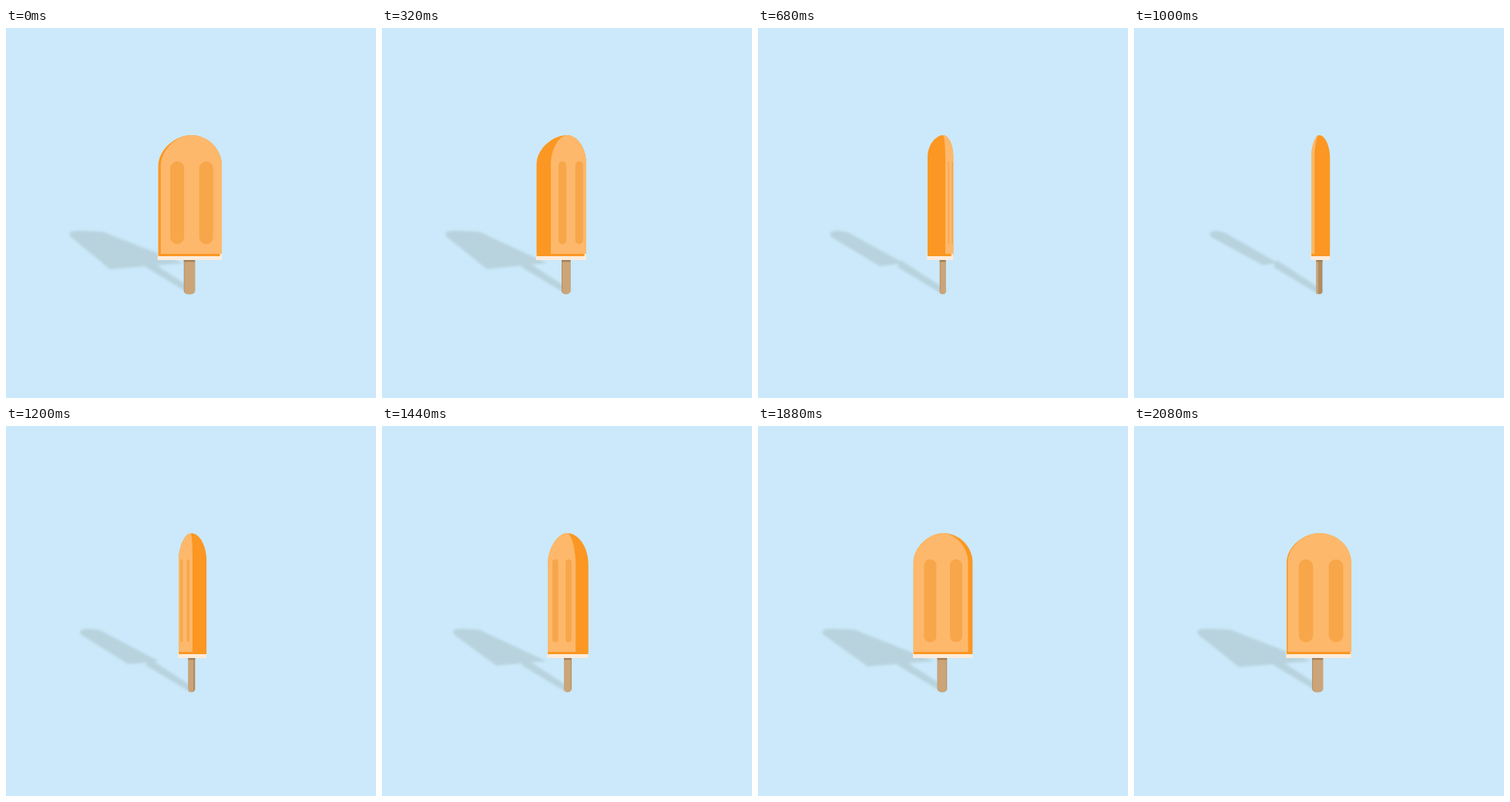
These frames come from a looping animation (480 by 480 pixels, 2120 ms). An HTML page with a canvas:

```html
<!DOCTYPE html>
<html>
<head>
<meta charset="utf-8">
<style>
html, body { margin: 0; height: 100%; overflow: hidden; background: #cbe9fa; }
canvas { display: block; }
</style>
</head>
<body>
<canvas id="stage" width="480" height="480"></canvas>
<script>
const ctx = document.getElementById('stage').getContext('2d');
const LOOP = 2120, STEP = 40, TOP = 139, APEX = 240;
const HALF_TURN = 53; // growth of the turn value over one loop

// time, turn, body left/right, dome height, stick left/right, groove inset,
// shadow x: tip, shoulder, right corner, lower corner
const keys = [
  [0, 3.3, 197.5, 280, 40, 230.7, 245.2, .155, 81, 124, 230, 135],
  [320, 18.5, 200.5, 265, 38, 233, 244.5, .217, 81, 124, 214, 136],
  [680, 23, 220, 253.3, 28, 235.7, 243.5, .35, 92, 112, 189, 158],
  [850, 26.5, 227, 253, 28, 236, 243.8, .25, 96, 110, 187, 164],
  [1000, 33, 230, 254.2, 30, 236.5, 244.5, .1, 97, 112, 187, 167],
  [1440, 36.5, 215, 267.7, 41, 236, 246, .167, 91, 124, 213, 148],
  [1720, 42, 205.3, 275, 39, 234, 245.3, .2, 84, 124, 226, 146],
  [2080, 54.5, 198, 281.7, 38, 231, 245.2, .172, 81, 124, 230, 136]
];

function keyAt(i) {
  const n = keys.length, lap = Math.floor(i / n), k = keys[i - lap * n].slice();
  k[0] += lap * LOOP;
  k[1] += lap * HALF_TURN;
  return k;
}

// Smooth curve through the keys, seamless across the loop point
function poseAt(t) {
  let i = keys.length - 1;
  while (keys[i][0] > t) i--;
  const [a, b, c, d] = [i - 1, i, i + 1, i + 2].map(keyAt);
  const h = c[0] - b[0], p = (t - b[0]) / h, q = 1 - p;
  return b.map((v, j) => {
    const m0 = (c[j] - a[j]) / (c[0] - a[0]) * h;
    const m1 = (d[j] - b[j]) / (d[0] - b[0]) * h;
    return q * q * (1 + 2 * p) * v + p * q * q * m0
      + p * p * (3 - 2 * p) * c[j] - p * p * q * m1;
  });
}

function rect(color, x0, y0, x1, y1) {
  ctx.fillStyle = color;
  ctx.fillRect(x0, y0, x1 - x0, y1 - y0);
}

function pill(color, x, y, w, h, radii) {
  ctx.fillStyle = color;
  ctx.beginPath();
  ctx.roundRect(x, y, w, h, radii);
  ctx.fill();
}

function curveUp(x, ry) {
  const y = TOP + ry;
  ctx.lineTo(x, y);
  ctx.bezierCurveTo(x, y - .55 * ry, APEX - .45 * (APEX - x), TOP, APEX, TOP);
}

function drawShadow(tip, shoulder, right, low) {
  ctx.save();
  ctx.filter = 'blur(1.8px)';
  ctx.fillStyle = '#b8d3de';
  ctx.beginPath();
  ctx.moveTo(low, 313 - (low - 135) * .17);
  ctx.lineTo(tip + 3, 271);
  ctx.quadraticCurveTo(tip - 3, 263, tip + 12, 263);
  ctx.lineTo(shoulder - 2, 264);
  ctx.quadraticCurveTo(shoulder + 4, 264, shoulder + 10, 268);
  ctx.lineTo(right, 305);
  ctx.closePath();
  ctx.moveTo(185, 301);
  ctx.lineTo(246, 341);
  ctx.lineTo(237, 344);
  ctx.lineTo(181, 310);
  ctx.fill();
  ctx.restore();
}

function drawStick(left, right, side, sideShare) {
  const w = right - left, r = Math.min(w / 2, 5);
  const edge = Math.max(.8, w * sideShare ** (side < 0 ? 2 : 6));
  pill('#b08c60', left, 299, w, 46.2, [0, 0, r, r]);
  if (edge < w) pill('#cba478', left + (side > 0 ? edge : 0), 299, w - edge, 46.2, [0, 0, r, r]);
  rect('#a27e58', left, 300, right, 303.3);
}

function drawIce(left, right, ry, side, inset) {
  rect('#fcecdc', left - .7, 293, right, 301);
  ctx.save();
  ctx.beginPath();
  ctx.moveTo(left, 296);
  curveUp(left, ry);
  ctx.bezierCurveTo(APEX + .55 * (right - APEX), TOP, right, TOP + .45 * ry, right, TOP + ry);
  ctx.lineTo(right, 296);
  ctx.closePath();
  ctx.fillStyle = '#fb9722';
  ctx.fill();
  ctx.clip();

  const edge = side > 0 ? left + side : right + side;
  const x0 = side > 0 ? edge : left, w = side > 0 ? right - edge : edge - left;
  if (w > 0) {
    const outer = side > 0 ? 480 : 0;
    ctx.beginPath();
    ctx.moveTo(edge, 293);
    curveUp(edge, ry);
    ctx.lineTo(outer, TOP);
    ctx.lineTo(outer, 293);
    ctx.fillStyle = '#fdb86b';
    ctx.fill();
    const gw = .24 * w - 1;
    if (gw > 0) {
      for (const f of [inset, inset + .475]) {
        pill('#f8a64a', x0 + f * w, 173, gw, 107.5, gw / 2);
      }
    }
    if (side > 0) rect('#fcecdc', right - Math.min(2.5, side * .75), 293, right, 296);
  }
  ctx.restore();
}

function draw(now) {
  const t = Math.floor(now % LOOP / STEP) * STEP;
  const [, turn, left, right, ry, s0, s1, inset, ...shadow] = poseAt(t);
  // positive: side face shows on the left; negative: on the right
  let side = turn < HALF_TURN / 2 ? turn : turn - HALF_TURN;
  side = Math.sign(side) * Math.min(Math.abs(side), right - left);
  rect('#cbe9fa', 0, 0, 480, 480);
  drawShadow(...shadow);
  drawStick(s0, s1, side, Math.abs(side) / (right - left));
  drawIce(left, right, ry, side, inset);
}

let start;
function tick(now) {
  start ??= now;
  draw(now - start);
  requestAnimationFrame(tick);
}
draw(0);
requestAnimationFrame(tick);
</script>
</body>
</html>
```
